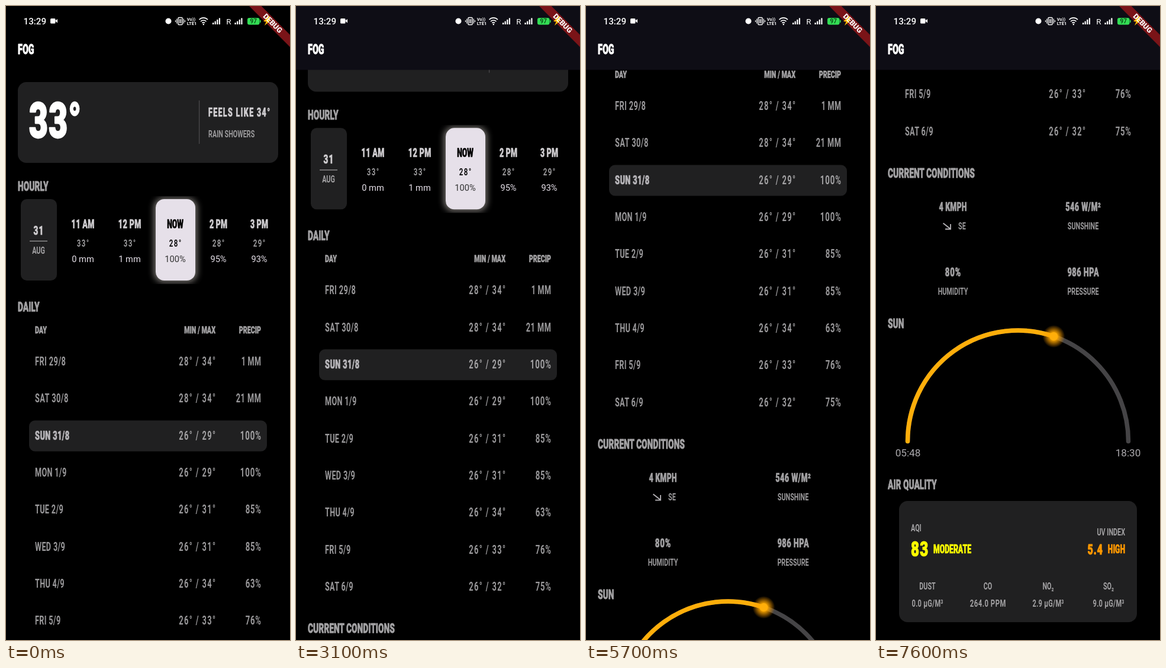
Animation of 480x1067 px, one loop 8000 ms. Source, as an HTML page:

```html
<!DOCTYPE html>
<html lang="en">
<head>
<meta charset="utf-8">
<title>Weather</title>
<style>
  html, body { margin: 0; width: 100%; height: 100%; overflow: hidden; background: #000; }
  svg { display: block; width: 100vw; height: 100vh; }
  text { font-family: Roboto, sans-serif; white-space: pre; }
  .display { font-stretch: 75%; }
</style>
</head>
<body>
<svg id="stage" viewBox="0 0 480 1067">
  <defs>
    <filter id="blur" x="-50%" y="-50%" width="200%" height="200%">
      <feGaussianBlur stdDeviation="5.5"/>
    </filter>
    <radialGradient id="glow">
      <stop offset="0" stop-color="#ffb300"/>
      <stop offset=".4" stop-color="#ffa800" stop-opacity=".85"/>
      <stop offset="1" stop-color="#ff9900" stop-opacity="0"/>
    </radialGradient>
    <clipPath id="hours"><rect x="0" y="320" width="480" height="148"/></clipPath>
  </defs>
  <g id="page"></g>
  <rect id="bar" width="480" height="107.5"/>
  <g id="chrome"></g>
</svg>
<script>
const $ = id => document.getElementById(id);
const page = $('page'), bar = $('bar'), chrome = $('chrome');

const WHITE = '#fff', BRIGHT = '#cfcdd0', TITLE = '#a3a2a4', DIM = '#9a999b',
      PALE = '#e6e0e9', CARD = '#202021', SUN = '#ffae0a';

function add(parent, tag, attrs, content) {
  const el = document.createElementNS('http://www.w3.org/2000/svg', tag);
  for (const key in attrs) el.setAttribute(key, attrs[key]);
  if (content) el.textContent = content;
  parent.appendChild(el);
  return el;
}

const rect = (parent, x, y, width, height, rx, fill, more) =>
  add(parent, 'rect', { x, y, width, height, rx, fill, ...more });
const path = (parent, d, stroke, width, more) =>
  add(parent, 'path', { d, stroke, 'stroke-width': width, fill: 'none', ...more });

// One condensing factor per weight, so the display face runs narrow.
const condense = {};
for (const weight of [700, 900]) {
  const probe = add(page, 'text', { class: 'display', 'font-size': 100, 'font-weight': weight }, 'CURRENT CONDITIONS');
  condense[weight] = 668 / probe.getComputedTextLength();
  probe.remove();
}

// Display text; figures run a little wider and looser than letters, bold gets an outline.
function head(parent, str, x, y, size, fill, { anchor = 'start', weight = 700 } = {}) {
  const share = str.replace(/\D/g, '').length / str.length;
  const k = condense[weight] * (1 + .1 * share);
  const gap = str.includes('°') ? 1.4 : share * 1.2;
  const shift = { start: 0, middle: gap / 2, end: gap }[anchor];
  return add(parent, 'text', {
    class: 'display', fill, 'font-size': size, 'font-weight': weight, 'text-anchor': anchor,
    stroke: weight > 700 ? fill : 'none', 'stroke-width': size * .035, 'stroke-linejoin': 'round',
    'letter-spacing': gap / k, transform: `translate(${x + shift} ${y}) scale(${k} 1)`
  }, str);
}

const plain = (parent, str, x, y, size, fill, anchor = 'middle', weight = 400) =>
  add(parent, 'text', { x, y, fill, 'font-size': size, 'text-anchor': anchor, 'font-weight': weight }, str);

const MID = { anchor: 'middle' }, END = { anchor: 'end' }, BOLD = { weight: 900 },
      MIDBOLD = { ...MID, ...BOLD }, ENDBOLD = { ...END, ...BOLD };

const section = (str, y) => head(page, str, 20, y, 22, TITLE, BOLD);

function drawNow() {
  rect(page, 20, 128, 440, 136, 14.6, CARD);
  head(page, '33°', 39, 221, 82, WHITE, BOLD);
  rect(page, 326, 159, 1.2, 73, 0, '#4c4b4e');
  head(page, 'FEELS LIKE 34°', 342, 185.5, 19.5, BRIGHT, BOLD);
  head(page, 'RAIN SHOWERS', 342, 220.5, 17.1, DIM);
}

function drawHours() {
  section('HOURLY', 311);
  rect(page, 25, 325, 61, 137, 10, CARD);
  head(page, '31', 55, 385, 19.5, BRIGHT, MIDBOLD);
  rect(page, 40, 395, 30, 1.2, 0, TITLE);
  head(page, 'AUG', 55, 417, 17.1, TITLE, MID);

  const now = add(page, 'g', { 'clip-path': 'url(#hours)' });
  rect(now, 250, 323, 73, 142, 16, '#77736f', { filter: 'url(#blur)' });
  rect(now, 253, 325, 67, 137, 14.6, PALE);

  [[130, '11\u2009AM', 33, '0 mm'], [209, '12\u2009PM', 33, '1 mm'], [286, 'NOW', 28, '100%'],
   [359, '2\u2009PM', 28, '95%'], [428, '3\u2009PM', 29, '93%']].forEach(([x, hour, temp, rain]) => {
    const on = hour === 'NOW';
    head(page, hour, x, 374, 19.5, on ? '#000' : BRIGHT, MIDBOLD);
    head(page, temp + '°', x, 404.5, 17.1, on ? '#111' : DIM, MID);
    plain(page, rain, x, 430.5, 14.65, on ? '#333' : PALE);
  });
}

function drawDays() {
  section('DAILY', 514);
  head(page, 'DAY', 49, 551, 17.1, TITLE, BOLD);
  head(page, 'MIN / MAX', 354, 551, 17.1, TITLE, ENDBOLD);
  head(page, 'PRECIP', 431, 551, 17.1, TITLE, ENDBOLD);
  rect(page, 39, 697.5, 402, 52, 10, CARD);

  [['FRI 29/8', 28, 34, '1 MM'], ['SAT 30/8', 28, 34, '21 MM'], ['SUN 31/8', 26, 29, '100%'],
   ['MON 1/9', 26, 29, '100%'], ['TUE 2/9', 26, 31, '85%'], ['WED 3/9', 26, 31, '85%'],
   ['THU 4/9', 26, 34, '63%'], ['FRI 5/9', 26, 33, '76%'], ['SAT 6/9', 26, 32, '75%']
  ].forEach(([day, min, max, rain], i) => {
    const y = 605 + i * 62.33, today = i === 2;
    head(page, day, 49, y, 19.5, today ? '#b8b6ba' : DIM, today ? BOLD : {});
    head(page, `${min}° / ${max}°`, 354, y, 19.5, today ? TITLE : DIM, END);
    head(page, rain, 431, y, 19.5, today ? TITLE : DIM, END);
  });
}

function drawConditions() {
  section('CURRENT CONDITIONS', 1175);
  [[130, 1231, '4 KMPH', ''], [350, 1231, '546 W/M²', 'SUNSHINE'],
   [130, 1341, '80%', 'HUMIDITY'], [350, 1341, '986 HPA', 'PRESSURE']].forEach(([x, y, value, name]) => {
    head(page, value, x, y, 19.5, TITLE, MIDBOLD);
    if (name) head(page, name, x, y + 31, 17.1, DIM, MID);
  });
  head(page, 'SE', 139, 1262, 17.1, DIM);
  path(page, 'M113.5 1251.5L125 1260.5M126 1253V1261.5H117', '#b5b3b7', 1.8);
}

function drawSun() {
  section('SUN', 1428);
  const cx = 240, cy = 1618.5, r = 186.5, angle = Math.PI * (1 - 461 / 762);
  const sx = cx + r * Math.cos(angle), sy = cy - r * Math.sin(angle);
  const round = { 'stroke-linecap': 'round' };
  const arc = (x1, y1, x2, y2) => `M${x1} ${y1}A${r} ${r} 0 0 1 ${x2} ${y2}`;
  path(page, arc(cx - r, cy, cx + r, cy), '#454446', 7.5, round);
  path(page, arc(cx - r, cy, sx, sy), SUN, 7.5, round);
  add(page, 'circle', { cx: sx, cy: sy, r: 19, fill: 'url(#glow)' });
  add(page, 'circle', { cx: sx, cy: sy, r: 7, fill: SUN });
  plain(page, '05:48', 54, 1643.5, 17.1, '#adabaf');
  plain(page, '18:30', 426, 1643.5, 17.1, '#adabaf');
}

function drawAir() {
  section('AIR QUALITY', 1699);
  rect(page, 39, 1719, 402, 204, 14.6, CARD);
  head(page, 'AQI', 59, 1770, 17.1, TITLE);
  head(page, '83', 59, 1812, 35, '#ffff00', BOLD);
  head(page, 'MODERATE', 97, 1807, 19.5, '#ffff00', BOLD);
  head(page, 'UV INDEX', 421, 1777, 17.1, TITLE, END);
  head(page, '5.4', 383, 1808.5, 24.4, '#ff9800', ENDBOLD);
  head(page, 'HIGH', 421, 1807, 19.5, '#ff9800', ENDBOLD);
  [['DUST', '0.0 µG/M³'], ['CO', '264.0 PPM'], ['NO₂', '2.9 µG/M³'], ['SO₂', '9.0 µG/M³']].forEach(([gas, value], i) => {
    const x = 87 + i * 102;
    head(page, gas, x, 1868, 17.1, TITLE, MID);
    head(page, value, x, 1897, 17.1, TITLE, MID);
  });
}

function drawSignal(x) {
  for (let i = 0; i < 4; i++) rect(chrome, x + i * 3.6, 28 - i * 2.6, 2.2, 3 + i * 2.6, .6, WHITE);
}

function drawChrome() {
  head(chrome, 'FOG', 20, 81, 23, WHITE, BOLD);
  plain(chrome, '13:29', 29.5, 30.5, 15.2, WHITE, 'start', 500);
  rect(chrome, 75, 21, 8.5, 8.5, 1.5, WHITE);
  add(chrome, 'path', { d: 'M83 25L87 22V28.5Z', fill: WHITE });

  add(chrome, 'circle', { cx: 274.5, cy: 25.5, r: 5, fill: WHITE });

  rect(chrome, 291, 19.5, 7, 12, 1, 'none', { stroke: WHITE, 'stroke-width': 1.4 });
  path(chrome, 'M293.5 22V29M295.5 22V29M288.7 21.5V29.5M300.3 21.5V29.5M286.5 24V27M302.5 24V27', WHITE, 1.2);
  plain(chrome, 'Vo))', 313, 24.5, 7.5, WHITE, 'middle', 700);
  plain(chrome, 'LTE1', 314, 32, 7.5, WHITE, 'middle', 700);

  path(chrome, 'M326.5 23A10 10 0 0 1 341 23M329 26A6.6 6.6 0 0 1 338.5 26M331.4 28.6A3.4 3.4 0 0 1 336 28.6', WHITE, 1.6);
  add(chrome, 'circle', { cx: 333.8, cy: 31, r: 1.2, fill: WHITE });
  drawSignal(349);
  plain(chrome, 'R', 376.5, 30.5, 13.5, WHITE);
  drawSignal(386.5);

  rect(chrome, 408, 20, 20.5, 11.5, 3, '#33dd55');
  rect(chrome, 429, 23.5, 1.6, 4.5, .8, '#33dd55');
  plain(chrome, '97', 418.2, 29.3, 10, '#06380f', 'middle', 500);

  add(chrome, 'path', { d: 'M411 0H431.6L480 48.4V69Z', fill: '#7a1418' });
  add(chrome, 'path', { d: 'M444 17L435 26H440L437 33L448 23H442.5L446 17Z', fill: '#ffc400' });
  add(chrome, 'text', {
    transform: 'translate(451 29) rotate(45)', y: 4.4, fill: WHITE,
    'font-size': 12.4, 'font-weight': 900, 'text-anchor': 'middle'
  }, 'DEBUG');
}

drawNow();
drawHours();
drawDays();
drawConditions();
drawSun();
drawAir();
drawChrome();

// Flings: start ms, end ms, from, to, deceleration power.
const LOOP = 8000, TICK = 100;
const flings = [
  [2400, 3500, 0, 130, 2.5],
  [3900, 5200, 130, 278, 2.5],
  [5400, 6400, 278, 555, 2.23],
  [6600, 7600, 555, 886, 2.7]
];

function scrollAt(ms) {
  let y = 0;
  for (const [start, end, from, to, power] of flings) {
    if (ms < start) break;
    const u = Math.min(1, (ms - start) / (end - start));
    y = from + (to - from) * (1 - (1 - u) ** power);
  }
  return y;
}

function render() {
  const ms = Math.floor(performance.now() % LOOP / TICK) * TICK;
  const y = scrollAt(ms);
  page.setAttribute('transform', `translate(0 ${-y.toFixed(2)})`);
  bar.setAttribute('fill', y > 0 ? '#0e0d15' : '#000');
  requestAnimationFrame(render);
}
render();
</script>
</body>
</html>
```
